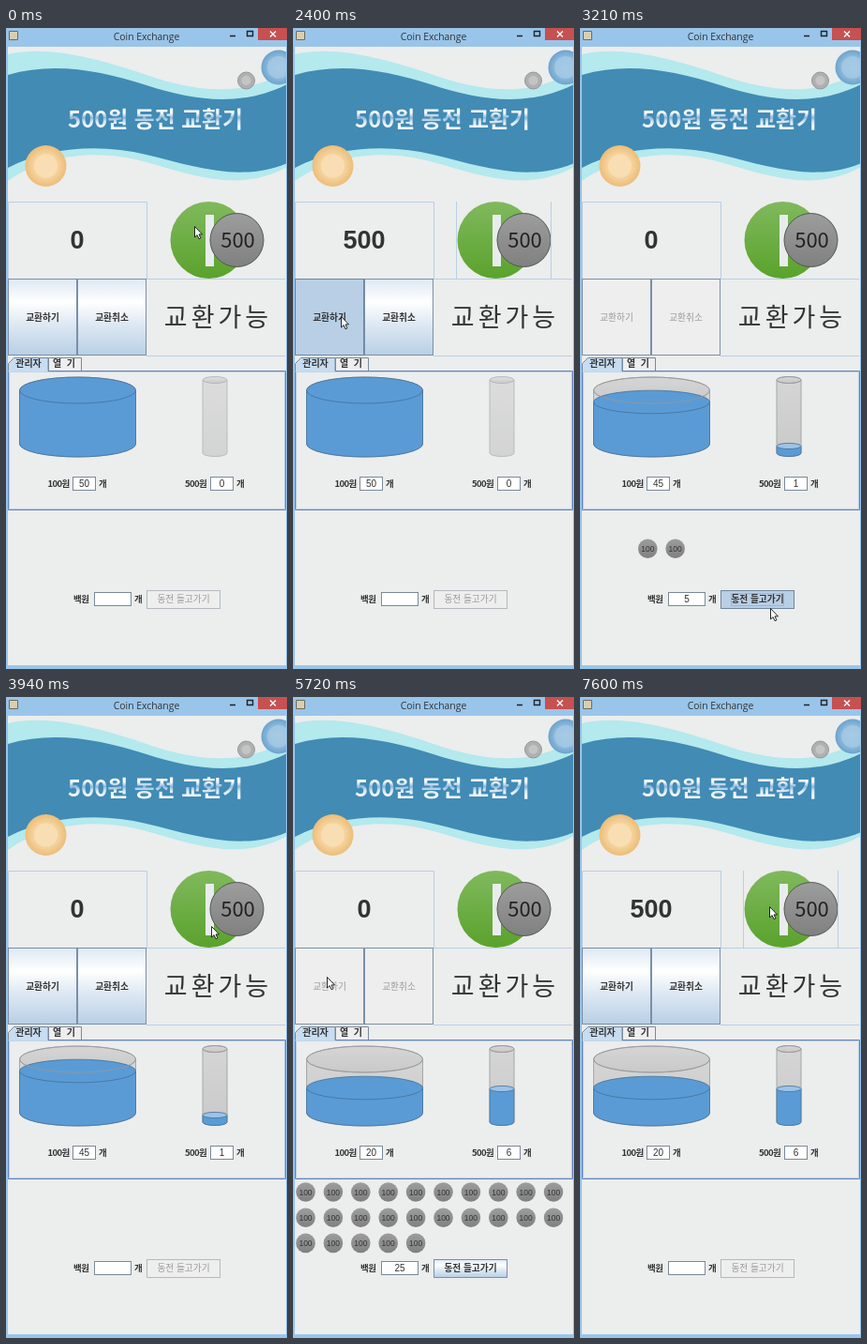
An HTML page that plays this animation: 300 by 683 pixels, repeating every 8 s.

```html
<!DOCTYPE html>
<html lang="ko">
<head>
<meta charset="utf-8">
<title>Coin Exchange</title>
<style>
  html, body { margin: 0; width: 100%; height: 100%; overflow: hidden; background: #eceded; }
  svg { display: block; width: 300px; height: 683px; }
  text { font: 10px "Noto Sans CJK KR", "Noto Sans CJK", "Noto Sans", sans-serif; fill: #333; }
  .mid { text-anchor: middle; }
  .bold { font-weight: 700; }
  .label { font-size: 9.5px; font-weight: 700; letter-spacing: -.6px; }
  .num { font: 10px "Liberation Sans", sans-serif; text-anchor: middle; }
  .coin text { font: 8.5px "Liberation Sans", sans-serif; text-anchor: middle; }
  .button rect { stroke: #7a8fa8; }
  .button text { font-size: 9.7px; font-weight: 700; text-anchor: middle; }
  .on rect { fill: url(#ocean); }
  .down rect { fill: #b8cfe5; stroke: #6f859e; }
  .off rect { fill: #eee; }
  .off text { fill: #999; font-weight: 500; }
  #take.off rect { stroke: #b4b9be; }
  #take .focus { fill: none; visibility: hidden; }
  #take.down .focus { visibility: visible; stroke: #9ab5d4; }
  .field { fill: #fff; stroke: #7a8a99; }
  .line { fill: none; stroke: #b8cfe5; }
  .glass { fill: url(#glass); stroke: #a6a6a6; }
  .empty { opacity: .7; }
  .water { fill: #5b9bd5; stroke: #41719c; stroke-width: .8; }
  .water.small { fill: #9dc3e6; }
</style>
</head>
<body>
<svg viewBox="0 0 300 683">
  <defs>
    <linearGradient id="ocean" x2="0" y2="1">
      <stop stop-color="#dde8f3"/><stop offset=".3" stop-color="#fff"/>
      <stop offset=".6" stop-color="#dde8f3"/><stop offset="1" stop-color="#b8cfe5"/>
    </linearGradient>
    <linearGradient id="glass" x2="0" y2="1">
      <stop stop-color="#d5d5d5"/><stop offset="1" stop-color="#c9c9c9"/>
    </linearGradient>
    <linearGradient id="green" x2="0" y2="1">
      <stop stop-color="#80b95d"/><stop offset="1" stop-color="#5aa22c"/>
    </linearGradient>
    <linearGradient id="grey" x2="0" y2="1">
      <stop stop-color="#9d9d9d"/><stop offset="1" stop-color="#808080"/>
    </linearGradient>
    <linearGradient id="shine" x2="0" y2="1">
      <stop offset=".35" stop-color="#fff"/><stop offset=".5" stop-color="#8db8dc"/>
      <stop offset=".62" stop-color="#d3e5f3"/><stop offset=".8" stop-color="#fff"/>
    </linearGradient>
    <radialGradient id="sky">
      <stop stop-color="#a9cde6"/><stop offset=".6" stop-color="#8ebbdc"/><stop offset="1" stop-color="#6ba3cd"/>
    </radialGradient>
    <radialGradient id="gold">
      <stop stop-color="#f9deb4"/><stop offset=".55" stop-color="#f6d5a2"/><stop offset="1" stop-color="#ecbd77"/>
    </radialGradient>
    <clipPath id="client"><path d="M2 20H299V679H2z"/></clipPath>
  </defs>

  <!-- window frame -->
  <path fill="#99c5eb" d="M0 0H300V683H0z"/>
  <path fill="#eceded" d="M2 20H299V679H2z"/>
  <path fill="#d9cfae" stroke="#6d6a5c" d="M3.5 3.5h9v9h-9z"/>
  <text class="mid" x="150" y="13" style="font:10.4px 'Open Sans',sans-serif">Coin Exchange</text>
  <path fill="#c75050" d="M269 0h31v13h-31z"/>
  <path fill="none" stroke="#fff" stroke-width="1.4" d="M282 3.5l6 6m0-6l-6 6"/>
  <path fill="none" stroke="#222" stroke-width="1.4" d="M239 8.5h6M257.5 3.5h6v5h-6z"/>

  <!-- banner -->
  <g clip-path="url(#client)">
    <path fill="#b4e9ed" d="M2 28C45 18 100 33 150 50S250 75 300 46V148C250 176 200 157 150 143C100 129 45 133 2 163z"/>
    <path fill="#418bb5" d="M2 50C50 36 100 45 150 61S250 85 300 60V144C250 165 200 147 150 135C100 123 45 127 2 149z"/>
    <circle cx="256.500" cy="56" r="9" fill="#b0b0b0" stroke="#969696"/>
    <circle cx="256.500" cy="56" r="5" fill="#c4c4c4"/>
    <circle cx="291" cy="42" r="18.500" fill="url(#sky)"/>
    <circle cx="291" cy="42" r="12" fill="#a6cbe5" opacity=".7"/>
    <circle cx="42.500" cy="147" r="22" fill="url(#gold)"/>
    <circle cx="42.500" cy="147" r="12.500" fill="#f9deb4"/>
  </g>
  <text class="bold mid" x="159.500" y="106" style="font-size:23.8px;fill:url(#shine)">500원 동전 교환기</text>

  <!-- amount and coin slot -->
  <path class="line" d="M2.500 185.500h148v82h-148zM150 267.500h148M150 349.500h148"/>
  <text id="amount" class="mid" x="76" y="235" style="font:bold 27px 'Liberation Sans',sans-serif"></text>
  <circle cx="216.500" cy="226" r="41" fill="url(#green)"/>
  <path fill="#e9ecec" d="M213 199h9v55h-9z"/>
  <circle cx="246.500" cy="226" r="28.500" fill="url(#grey)" stroke="#555"/>
  <text class="mid" x="247.500" y="234" style="font-size:22px;fill:#222">500</text>
  <path id="slot" class="line" d="M174.500 185v82m101-82v82"/>

  <g id="swap" class="button"><rect x="2.500" y="267.500" width="73" height="81"/><text x="39" y="312">교환하기</text></g>
  <g id="undo" class="button"><rect x="76.500" y="267.500" width="73" height="81"/><text x="113" y="312">교환취소</text></g>
  <text class="mid" x="226.500" y="317.500" style="font-size:27px;letter-spacing:4px">교환가능</text>

  <!-- tabs -->
  <path fill="#eee" stroke="#7a8a99" d="M45.500 365.500v-14h35v14z"/>
  <path fill="#eceded" stroke="#6382bf" d="M2.500 365.500h296v148h-296z"/>
  <path class="line" d="M3.500 366.500h294v146h-294z"/>
  <path fill="#c8ddf2" d="M2.500 366.500v-9l6-6h36.500v15z"/>
  <path fill="none" stroke="#7a8a99" d="M2.500 365.500v-8l6-6h36.500v14"/>
  <text class="bold mid" x="24" y="361">관리자</text>
  <text class="bold mid" x="62" y="361">열&#160; 기</text>

  <g id="tanks"></g>
  <g id="coins"></g>

  <g id="fields"></g>
  <g id="take" class="button">
    <rect x="150.500" y="599.500" width="78" height="19"/>
    <rect class="focus" x="161.500" y="602.500" width="56" height="13"/>
    <text x="189.500" y="612">동전 들고가기</text>
  </g>

  <path id="cursor" fill="#fff" stroke="#111" stroke-width=".9" stroke-linejoin="round"
    d="M.5 .5v11.500l2.600-2.400 1.900 4.100 1.900-.8-1.900-4h3.500z"/>
</svg>
<script>
const LOOP = 8000;
const $ = id => document.getElementById(id);

// Tanks: x centre, half width, rim radius, rim y, base y
const tanks = { big: [76.5, 62, 14, 386, 443], small: [223, 13, 3.5, 375, 453] };

const rim = (cx, cy, rx, ry, kind) =>
  `<ellipse class="${kind}" cx="${cx}" cy="${cy}" rx="${rx}" ry="${ry}"/>`;

const body = (cx, rx, ry, top, base, kind) =>
  `<path class="${kind}" d="M${cx - rx} ${top}V${base}a${rx} ${ry} 0 0 0 ${2 * rx} 0V${top}"/>`;

function drawTank(name, level) {
  const [cx, rx, ry, top, base] = tanks[name];
  const glass = level ? 'glass' : 'glass empty';
  let out = body(cx, rx, ry, top, base, glass) + rim(cx, top, rx, ry, glass);
  if (level) {
    out += body(cx, rx, ry, level, base, 'water')
      + rim(cx, level, rx, level > top ? ry * .88 : ry, 'water ' + name);
  }
  if (level > top) out += `<ellipse cx="${cx}" cy="${top}" rx="${rx}" ry="${ry}" fill="none" stroke="#999" stroke-width=".8"/>`;
  return out;
}

function drawCoins(first, count) {
  return Array.from({ length: count }, (_, k) => {
    const i = first + k, x = 13.5 + i % 10 * 29.4, y = 527.5 + Math.floor(i / 10) * 27.2;
    return `<g class="coin" transform="translate(${x} ${y})">
      <circle r="10.3" fill="url(#grey)"/><text y="3">100</text></g>`;
  }).join('');
}

const drawField = (label, lx, x, y, w, id) =>
  `<text class="label" x="${lx}" y="${y}">${label}</text>
   <rect class="field" x="${x + .5}" y="${y - 10.5}" width="${w}" height="14"/>
   <text class="num" id="${id}" x="${x + w / 2 + .5}" y="${y}"></text>
   <text class="label" x="${x + w + 4}" y="${y}">개</text>`;

$('fields').innerHTML = drawField('100원', 44.5, 71, 489, 24, 'hundreds')
  + drawField('500원', 191, 218, 489, 24, 'fives') + drawField('백원', 72, 94, 612, 39, 'out');

// Pointer moves: first step, last step, number of steps, destination
const moves = [
  [1729, 2300, 6, 51, 307], [2650, 3060, 5, 203, 618], [3390, 3390, 1, 217, 494],
  [3550, 3610, 2, 217, 296], [3750, 3950, 3, 220, 218], [5030, 5030, 1, 217, 242],
  [5200, 5400, 3, 36, 298], [5820, 6020, 3, 181, 529], [6170, 6170, 1, 181, 590],
  [6330, 6330, 1, 181, 613], [6960, 7030, 2, 196, 337], [7190, 7250, 2, 198, 242],
  [7400, 7460, 2, 202, 223]
];

const start = {
  amount: 0, slot: false, swap: 'on', undo: 'on', take: 'off',
  hundreds: 50, fives: 0, big: 386, small: 0, first: 0, count: 0, out: ''
};
const locked = { swap: 'off', undo: 'off', take: 'on' };
const collected = { swap: 'on', undo: 'on', take: 'off', count: 0, out: '' };
const events = [
  [1500, { slot: true }],
  [1614, { amount: 500 }],
  [2400, { swap: 'down' }],
  [2480, { amount: 0, slot: false, hundreds: 45, fives: 1, big: 398.5, small: 445.5, first: 12, count: 2 }],
  [2650, { ...locked, out: 5 }],
  [3210, { take: 'down' }],
  [3270, collected],
  [3950, { slot: true }],
  [4050, { amount: 500 }],
  [4260, { amount: 1000 }],
  [4460, { amount: 1500 }],
  [4700, { amount: 2000 }],
  [4970, { amount: 2500 }],
  [5500, { swap: 'down' }],
  [5720, { ...locked, amount: 0, slot: false, hundreds: 20, fives: 6, big: 416.5, small: 417.5, first: 0, count: 25, out: 25 }],
  [6440, { take: 'down' }],
  [6700, collected],
  [7460, { slot: true }],
  [7600, { amount: 500 }]
];

function pointerAt(t) {
  let x = 201, y = 211;
  for (const [t0, t1, n, tx, ty] of moves) {
    if (t < t0) break;
    const gap = n > 1 ? (t1 - t0) / (n - 1) : 1;
    const p = Math.min(n, Math.floor((t - t0) / gap + 1e-6) + 1) / n;
    x += (tx - x) * p;
    y += (ty - y) * p;
  }
  return [x, y];
}

let shown = -1;
function render(now) {
  const t = now % LOOP;
  const passed = events.filter(e => e[0] <= t);
  if (passed.length !== shown) {
    shown = passed.length;
    const s = Object.assign({}, start, ...passed.map(e => e[1]));
    for (const id of ['amount', 'hundreds', 'fives', 'out']) $(id).textContent = s[id];
    for (const id of ['swap', 'undo', 'take']) $(id).setAttribute('class', 'button ' + s[id]);
    $('slot').style.display = s.slot ? '' : 'none';
    $('tanks').innerHTML = drawTank('big', s.big) + drawTank('small', s.small);
    $('coins').innerHTML = drawCoins(s.first, s.count);
  }
  $('cursor').setAttribute('transform', `translate(${pointerAt(t)})`);
}

function tick() {
  render(performance.now());
  requestAnimationFrame(tick);
}
tick();
</script>
</body>
</html>
```
